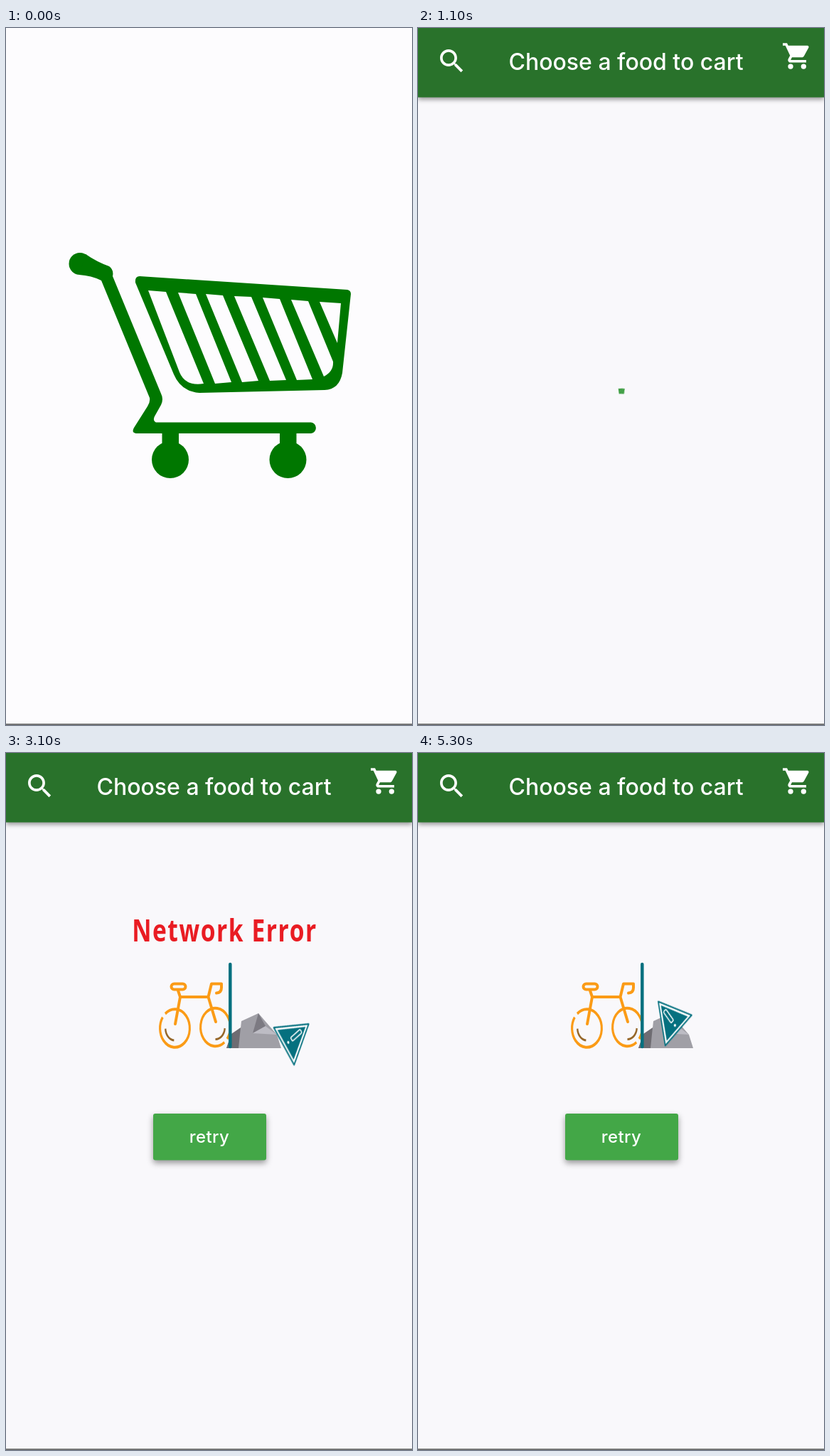
These frames come from a looping animation (571 by 980 pixels, 5400 ms). An HTML page without scripts:

```html
<!DOCTYPE html>
<html lang="en">
<head>
<meta charset="utf-8">
<title>Food cart</title>
<style>
  @property --d { syntax: "<number>"; inherits: true; initial-value: 0; }

  html, body { margin: 0; width: 100%; height: 100%; overflow: hidden; background: #fdfcfe; }
  svg { display: block; width: 571px; height: 980px; }

  /* every part shares one 5.4 s clock and moves in 0.1 s steps */
  .dim, .app, .spin, .error, .bike, .sign, .label {
    animation: 5.4s step-end infinite;
  }
  .dim { animation-name: dim; }
  .app { animation-name: app; }
  .spin { animation-name: spin; }
  .error { animation-name: error; }
  .bike { animation-name: ride; transform: translateX(calc(var(--d) * 1px)); }
  .wheel { transform: rotate(calc(var(--d) * 7.6deg)); }
  .sign { animation-name: fall; }
  .label { animation-name: label; }

  .bar { filter: drop-shadow(0 3px 3px #0006); }
  .button { filter: drop-shadow(0 4px 4px #0006); }
  .ui { font: 500 32px Inter, Roboto, sans-serif; fill: #fff; text-anchor: middle; }
  .ui.small { font-size: 24px; letter-spacing: .4px; }
  .label { font: 600 43px "Noto Sans", "Open Sans", sans-serif; letter-spacing: 2px; fill: #e91c23; }

  @keyframes dim {
    0% { opacity: 0; }
    7.4% { opacity: .05; }
    9.25% { opacity: .16; }
    11.11% { opacity: .31; }
    12.96% { opacity: .6; }
    14.81%, 100% { opacity: 1; }
  }
  @keyframes app {
    0% { opacity: 0; }
    20.37%, 100% { opacity: 1; }
  }
  @keyframes spin {
    0%, 20.37% { opacity: 1; stroke-dasharray: 17 343; transform: rotate(-98deg); }
    22.22% { stroke-dasharray: 28 332; transform: rotate(-86deg); }
    24.07% { opacity: 1; stroke-dasharray: 70 290; transform: rotate(-68deg); }
    25.92%, 100% { opacity: 0; }
  }
  @keyframes error {
    0% { opacity: 0; }
    25.92%, 100% { opacity: 1; }
  }
  @keyframes ride {
    0%, 25.92%, 74.07% { --d: -110; }
    27.77%, 75.92% { --d: -108; }
    29.62%, 77.77% { --d: -101; }
    31.48%, 79.62% { --d: -78; }
    33.33%, 81.48% { --d: -49; }
    35.18% { --d: -21.7; }
    83.33% { --d: -23; }
    37.03%, 85.18% { --d: -8; }
    38.88%, 87.03% { --d: -2; }
    40.74%, 88.88%, 100% { --d: 0; }
  }
  @keyframes fall {
    0%, 25.92%, 74.07% { transform: translate(.5px, 276px); }
    44.44%, 92.59% { transform: translate(1px, 278px) rotate(-1deg); }
    46.29%, 94.44% { transform: translate(3px, 297px) rotate(-8deg); }
    48.14%, 96.29% { transform: translate(8px, 330px) rotate(-20deg); }
    49.99%, 98.14% { transform: translate(52.2px, 376.3px) rotate(-42deg); }
    51.85% { transform: translate(86px, 398px) rotate(12deg); }
    53.7%, 100% { transform: translate(111.2px, 401.7px) rotate(55deg); }
  }
  @keyframes label {
    0% { opacity: 0; }
    53.7% { opacity: 1; }
    74.07%, 100% { opacity: 0; }
  }
</style>
</head>
<body>
<svg viewBox="0 0 571 980" xmlns="http://www.w3.org/2000/svg">
  <defs>
    <g id="caster">
      <path d="M-11.5-39h23.5v20h-23.5z"/>
      <circle r="26"/>
    </g>
  </defs>

  <!-- splash -->
  <rect width="571" height="980" fill="#fdfcfe"/>
  <g fill="#007700">
    <path fill-rule="evenodd" d="M188 349L480 368Q485 369 485 374L473 485Q469 508 448 509L272 513Q246 511 236 487L182 358Q181 349 188 349Z
      M200 369L225 371 278 500Q252 504 244 484Z
      M242 372L267 374 317 498 294 500Z
      M281 374L305 376 355 496 332 498Z
      M321 377L345 378 394 495 371 496Z
      M361 379L385 381 431 494 409 495Z
      M401 382L425 384 460 469Q461 483 447 490Z
      M441 385L471 387 466 443Z"/>
    <circle cx="104" cy="331.5" r="15.5"/>
    <path d="M112 318Q128 329 145 335Q152 340 150 349L218 514Q222 522 218 530L209 546Q206 552 211 554.500H429A7.800 7.800 0 0 1 429 570H183Q176 569 180 562L199 532Q203 526 202 520L134 355Q120 348 103 347Z"/>
    <use href="#caster" x="231" y="607"/>
    <use href="#caster" x="396.500" y="607"/>
  </g>
  <path d="M0 979H571" stroke="#777" stroke-width="2"/>
  <rect class="dim" width="571" height="980"/>

  <g class="app">
    <rect width="571" height="980" fill="#f9f8fb"/>
    <rect class="bar" width="571" height="97.500" fill="#29722b"/>
    <g fill="#fff">
      <path transform="translate(25.500 24.500) scale(1.840)" d="M15.500 14h-.79l-.28-.27C15.410 12.590 16 11.110 16 9.500 16 5.910 13.090 3 9.500 3S3 5.910 3 9.500 5.910 16 9.500 16c1.610 0 3.090-.59 4.230-1.570l.27.28v.79l5 4.990L20.490 19l-4.990-5zm-6 0C7.010 14 5 11.990 5 9.500S7.010 5 9.500 5 14 7.010 14 9.500 11.990 14 9.500 14z"/>
      <g transform="translate(511.200 17.500) scale(1.830)">
        <path d="M1 2v2h2l3.600 7.590-1.350 2.450C4.500 15.400 5.500 17 7 17h12v-2H7.420c-.2 0-.3-.2-.22-.37l.9-1.630h7.450c.75 0 1.410-.41 1.750-1.030l3.580-6.490C21.200 4.800 20.700 4 20 4H5.210l-.94-2z"/>
        <circle cx="7" cy="20" r="2"/>
        <circle cx="17" cy="20" r="2"/>
      </g>
    </g>
    <text class="ui" x="292.500" y="58.500">Choose a food to cart</text>

    <g transform="translate(286 538)">
      <circle class="spin" r="27.500" pathLength="360" fill="none" stroke="#43a047" stroke-width="7.500"/>
    </g>

    <g class="error">
      <rect class="button" x="207" y="507" width="159" height="65.500" rx="3" fill="#43a747"/>
      <text class="ui small" x="286" y="547.500">retry</text>

      <!-- rock -->
      <path fill="#a09fa6" d="M310 415L317 395 330 387 331 377 355 366 381 396 387 415Z"/>
      <path fill="#6e6c72" d="M310 415L317 395 330 386 327 415Z"/>
      <path fill="#7c7a82" d="M355 366L365 384 347 394Z"/>
      <path fill="#bdbcc4" d="M365 384L381 396 347 394Z"/>

      <g class="bike" fill="none" stroke="#fb9b16" stroke-width="4" stroke-linecap="round" stroke-linejoin="round">
        <rect x="232.500" y="324.500" width="20" height="8" rx="4"/>
        <path d="M242 334L245 343 238 381M245 343H284.500M295 378L284.500 343 289 324.500H303V330Q303 337 296 337.500"/>
        <g transform="translate(237.500 387) scale(.78 1)">
          <g class="wheel" stroke-linecap="butt">
            <circle r="26.800" pathLength="360" stroke-dasharray="345 15" transform="rotate(-130.500)"/>
            <path d="M-1.500 17A17 17 0 0 1-17 .6" stroke="#96672a" stroke-width="3"/>
          </g>
        </g>
        <g transform="translate(294.500 385.500) scale(.78 1)">
          <g class="wheel" stroke-linecap="butt">
            <circle r="26.800" pathLength="360" stroke-dasharray="345 15" transform="rotate(52.500)"/>
            <path d="M17 1.500A17 17 0 0 1 0 17" stroke="#96672a" stroke-width="3"/>
          </g>
        </g>
      </g>

      <path d="M315.300 297V413" stroke="#05707f" stroke-width="4.500" stroke-linecap="round"/>

      <g transform="translate(316 0) scale(.78 1)">
        <g class="sign">
          <path d="M0-36L32 18.500H-32Z" fill="#fff" stroke="#05707f" stroke-width="2.200" stroke-linejoin="round"/>
          <path d="M0-29L25.500 15H-25.500Z" fill="#05707f"/>
          <rect x="-3" y="-19" width="6" height="21" rx="2" fill="none" stroke="#fff" stroke-width="1.700"/>
          <circle cy="9" r="2" fill="#fff"/>
        </g>
        <text class="label" x="-178" y="265.500">Network Error</text>
      </g>
    </g>
    <path d="M0 979H571" stroke="#777" stroke-width="2"/>
  </g>
</svg>
</body>
</html>
```
